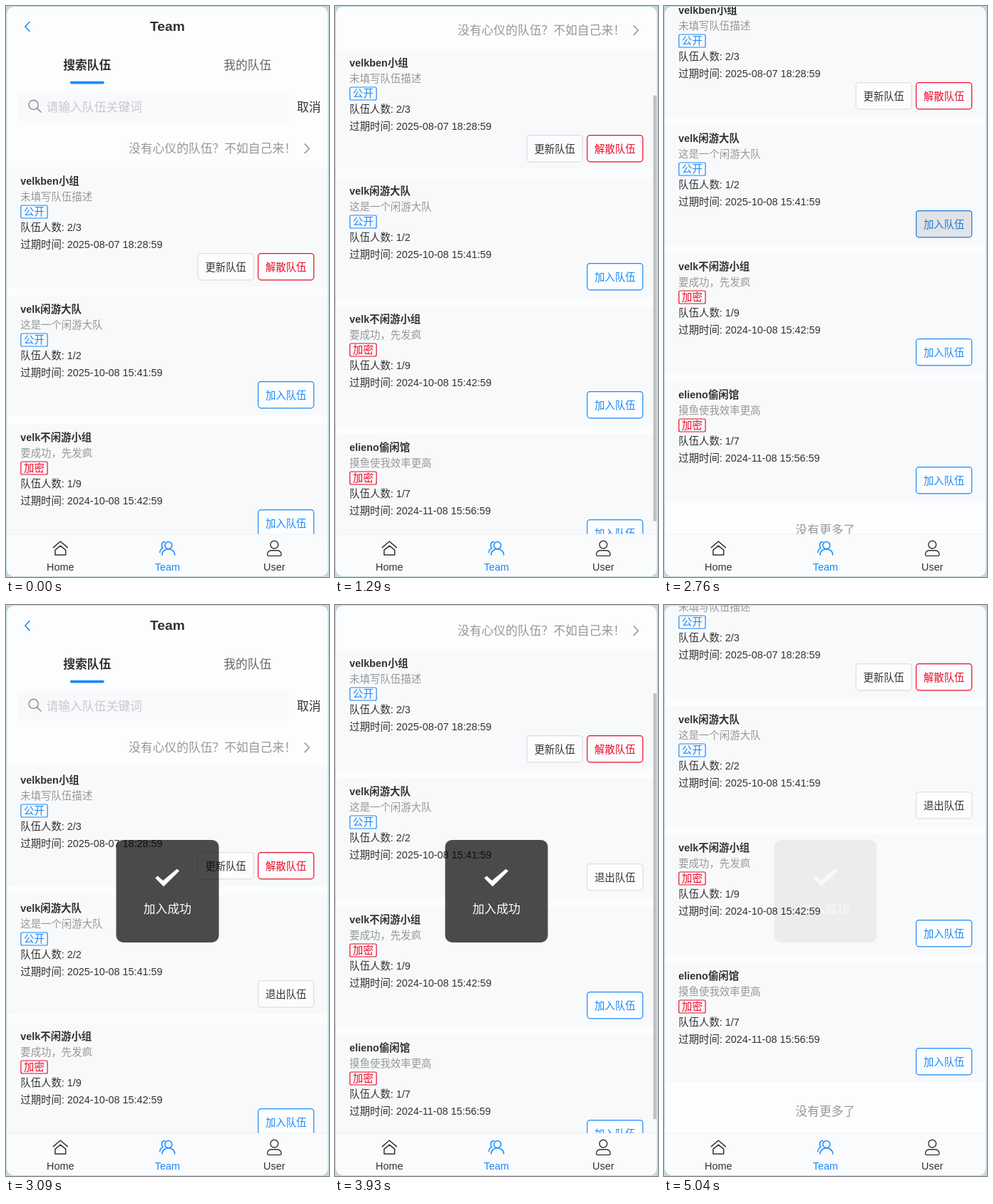
An HTML page for the animation above (8000 ms loop, 453 by 802 pixels).

```html
<!DOCTYPE html>
<html lang="zh-CN">
<head>
<meta charset="utf-8">
<title>Team</title>
<style>
html, body { margin: 0; width: 100%; height: 100%; overflow: hidden; background: #c3d9db; }
svg { display: block; width: 453px; height: 802px; }
text { font-family: "Liberation Sans", "Noto Sans CJK SC", "Noto Sans CJK", sans-serif; white-space: pre; }
</style>
</head>
<body>
<svg id="stage" viewBox="0 0 453 802" xmlns="http://www.w3.org/2000/svg"></svg>
<script>
const LOOP = 8000, TICK = 30;
const BLUE = '#1989fa', RED = '#ee0a24', DARK = '#323233', GREY = '#969799', LINE = '#dcdee0';
const PAGE = '#fcfdfe', CARD = '#f8f9fb';
const LEFT = 1.3, WIDTH = 450, VIEW = 800, CONTENT = 1066, CARD_TOP = 227, CARD_STEP = 180;

const text = (x, y, str, { size = 14.4, fill = DARK, bold = false, anchor = 'start', id = '' } = {}) =>
  `<text x="${x}" y="${y}" font-size="${size}" fill="${fill}" text-anchor="${anchor}"` +
  `${bold ? ' font-weight="700"' : ''}${id ? ` id="${id}"` : ''}>${str}</text>`;

const rect = (x, y, w, h, fill, extra = '') =>
  `<rect x="${x}" y="${y}" width="${w}" height="${h}" fill="${fill}" ${extra}/>`;

// A box whose border lies inside its edges.
const outlined = (x, y, w, h, r, fill, border) =>
  rect(x + .6, y + .6, w - 1.2, h - 1.2, fill, `rx="${r}" stroke="${border}" stroke-width="1.2"`);

const line = (d, color, width = 1.5) =>
  `<path d="${d}" fill="none" stroke="${color}" stroke-width="${width}" stroke-linecap="round" stroke-linejoin="round"/>`;

const button = (x, y, label, color, border = color) =>
  outlined(x, y, 79.2, 38.4, 4, '#fcfdff', border) +
  text(x + 39.6, y + 24.6, label, { fill: color, anchor: 'middle' });

const joinButton = y => button(353.1, y, '加入队伍', BLUE);

const teams = [
  { name: 'velkben小组', about: '未填写队伍描述', count: '2/3', until: '2025-08-07 18:28:59',
    actions: y => button(268.6, y, '更新队伍', DARK, LINE) + button(353.1, y, '解散队伍', RED) },
  { name: 'velk闲游大队', about: '这是一个闲游大队', count: '1/2', until: '2025-10-08 15:41:59',
    actions: y => `<g id="join">${joinButton(y)}${rect(353.1, y, 79.2, 38.4, '#000', 'id="press" rx="4.5" opacity=".1"')}</g>` +
      `<g id="leave">${button(353.1, y, '退出队伍', DARK, LINE)}</g>` },
  { name: 'velk不闲游小组', about: '要成功，先发疯', locked: true, count: '1/9', until: '2024-10-08 15:42:59', actions: joinButton },
  { name: 'elieno偷闲馆', about: '摸鱼使我效率更高', locked: true, count: '1/7', until: '2024-11-08 15:56:59', actions: joinButton }
];

function card(team, i) {
  const y = CARD_TOP + i * CARD_STEP, tone = team.locked ? RED : BLUE;
  return rect(LEFT, y, WIDTH, 168, CARD) +
    text(20.3, y + 24, team.name, { bold: true }) +
    text(20.3, y + 46.4, team.about, { fill: GREY }) +
    outlined(20.3, y + 52.4, 38.4, 19.2, 2, 'none', tone) +
    text(25.1, y + 67.3, team.locked ? '加密' : '公开', { fill: tone }) +
    text(20.3, y + 89.3, '队伍人数: ' + team.count, { id: 'count' + i }) +
    text(20.3, y + 113.2, '过期时间: ' + team.until) +
    team.actions(y + 120);
}

const header =
  line('M33 22.5L26.8 29L33 35.5', BLUE, 1.6) +
  text(226.4, 35, 'Team', { size: 19.2, bold: true, anchor: 'middle' }) +
  text(113.8, 88.6, '搜索队伍', { size: 16.8, bold: true, anchor: 'middle' }) +
  text(338.8, 88.6, '我的队伍', { size: 16.8, fill: '#646566', anchor: 'middle' }) +
  rect(89.8, 105.8, 48, 3.6, BLUE, 'rx="1.8"') +
  rect(15.7, 121.4, 381, 40.8, CARD, 'rx="2"') +
  '<circle cx="38.6" cy="138.8" r="6.6" fill="none" stroke="#8b8c8f" stroke-width="1.4"/>' +
  line('M43.5 143.6L49 149', '#8b8c8f', 1.5) +
  text(56.5, 147.6, '请输入队伍关键词', { size: 16.8, fill: '#c8c9cc' }) +
  text(408, 147.6, '取消', { size: 16.8 }) +
  text(172, 206.2, '没有心仪的队伍？不如自己来！', { size: 16.8, fill: GREY }) +
  line('M419 193.8L425.2 200.2L419 206.6', GREY, 1.6);

const tabbar =
  rect(LEFT, 742, WIDTH, 60, '#fafbfd') + rect(LEFT, 741.5, WIDTH, .8, '#ebedf0') +
  '<g transform="translate(.3 0)">' +
  line('M66 760.6L76 752L86 760.6M68.6 764.2L76 758.2L83.4 764.2V771H68.6Z', DARK) +
  line('M218.6 771C218.6 760 236.4 760 236.4 771M215.4 767.5C215.6 764.4 217.2 762.4 219.6 761.6C217 758.4 217.8 752.8 222.4 752.6', BLUE) +
  `<circle cx="227.5" cy="757.5" r="5" fill="none" stroke="${BLUE}" stroke-width="1.5"/>` +
  `<circle cx="376" cy="756.6" r="5.4" fill="none" stroke="${DARK}" stroke-width="1.4"/>` +
  line('M371.5 764.8H380.5C384 764.8 386 768 385.8 770.6Q385.6 772.4 383.6 772.4H368.4Q366.4 772.4 366.2 770.6C366 768 368 764.8 371.5 764.8Z', DARK, 1.4) +
  ['Home', 'Team', 'User'].map((s, i) =>
    text(76 + 150 * i, 793, s, { fill: i === 1 ? BLUE : DARK, anchor: 'middle' })).join('') + '</g>';

const toast =
  rect(154.5, 329.9, 144, 144, '#000', 'rx="9.6" fill-opacity=".7"') +
  '<path d="M209.3 383.4L212.6 380.4L220.2 387L239.6 370.8L243.2 373.6L221 395.4Z" fill="#fff"/>' +
  text(226.4, 433, '加入成功', { size: 16.8, fill: '#fff', anchor: 'middle' });

document.getElementById('stage').innerHTML =
  `<defs><clipPath id="screen"><rect x="${LEFT}" y="1" width="${WIDTH}" height="${VIEW}" rx="10"/></clipPath></defs>` +
  '<g clip-path="url(#screen)">' + rect(0, 0, 453, 802, PAGE) +
  `<g id="page">${header}${teams.map(card).join('')}` +
  text(226.3, 981.8, '没有更多了', { size: 16.8, fill: GREY, anchor: 'middle' }) + '</g>' +
  tabbar + rect(446.3, 1, 5, 598, '#c1c1c3', 'id="thumb"') +
  `<g id="toast">${toast}</g></g>`;

const part = Object.fromEntries(
  ['page', 'thumb', 'toast', 'join', 'leave', 'press', 'count1'].map(id => [id, document.getElementById(id)]));
const show = (el, on) => el.setAttribute('visibility', on ? 'visible' : 'hidden');
const ramp = (t, from, to) => Math.min(1, Math.max(0, (t - from) / (to - from)));

// Wheel scrolling: eases in briefly, then settles.
function glide(p) {
  const q = p ** .785;
  return q * q * (3 - 2 * q);
}

function scrollAt(t) {
  return t < 2940 ? 240 * glide(ramp(t, 1140, 1410)) : 265 * glide(ramp(t, 3810, 4050));
}

function thumbAlpha(t) {
  if (t < 1140 || (t >= 2940 && t < 3810)) return 0;
  return t < 2940 ? 1 - ramp(t, 1680, 1950) : 1 - ramp(t, 4350, 4590);
}

// The closing fade halts just before it completes.
function toastAlpha(t) {
  const enter = 1 - (1 - ramp(t, 2910, 3090)) ** 1.7;
  const exit = ramp(Math.min(t, 5040), 4770, 5052) ** 1.7;
  return enter * (1 - exit);
}

function render(time) {
  const t = Math.floor(time / TICK) * TICK;
  const y = Math.round(scrollAt(t)), joined = t >= 2940;
  part.page.setAttribute('transform', `translate(0 ${-y})`);
  part.thumb.setAttribute('y', 1 + y * VIEW / CONTENT);
  part.thumb.setAttribute('opacity', thumbAlpha(t));
  part.toast.setAttribute('opacity', toastAlpha(t));
  part.count1.textContent = '队伍人数: ' + (joined ? '2/2' : '1/2');
  part.join.setAttribute('display', joined ? 'none' : 'inline');
  show(part.leave, joined);
  show(part.press, t >= 2760 && !joined);
}

const start = performance.now();
function loop() {
  render((performance.now() - start) % LOOP);
  requestAnimationFrame(loop);
}
loop();
</script>
</body>
</html>
```
